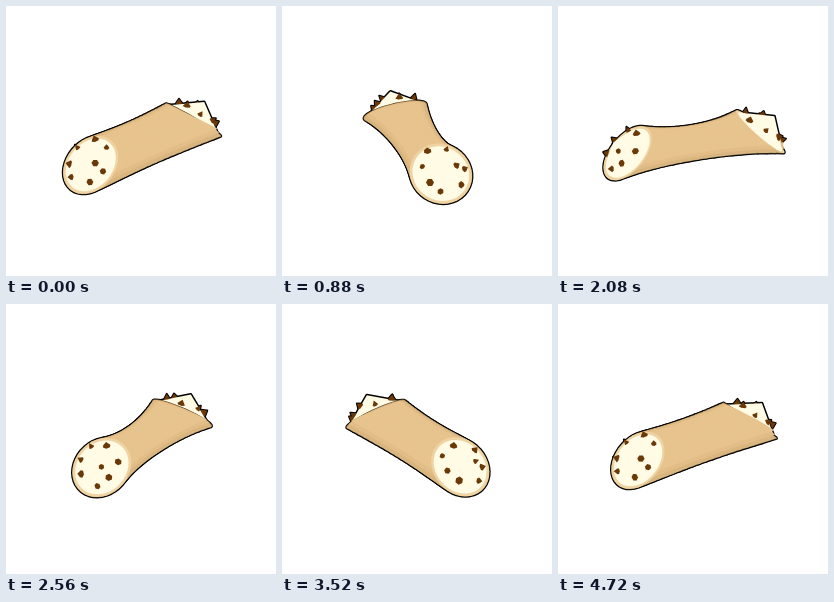
These frames come from a looping animation (270 px wide and 270 px high, 4.8 s). An HTML page with a canvas:

```html
<!DOCTYPE html>
<html>
<head>
<meta charset="utf-8">
<title>Turning cannoli</title>
<style>
html, body { margin: 0; width: 100%; height: 100%; overflow: hidden; background: #fff; }
canvas { display: block; width: 100vmin; height: 100vmin; }
</style>
</head>
<body>
<canvas id="stage" width="270" height="270"></canvas>
<script>
const ctx = document.getElementById('stage').getContext('2d');
const { sin, cos, PI, hypot, atan2 } = Math;
const STEP = 80, STEPS = 60, START = -47 * PI / 180;
const PITCH_SIN = 0.47, PITCH_COS = 0.883;
const HALF = 70, WIDE = 32, TALL = 22, SLANT = 23, PEAK = 15;
const WAIST = 0.8, TWIST = 0.2, LIP = 0.91;
const CREAM = '#fffbe4', CHOCOLATE = '#6b3908', RIM = '#efd3a2', EDGE = '#4d3519';
const SHELL = ['#d9b57f', '#e2bd87', '#e7c38d'];

// Chip places on each end, as sideways and upward fractions of the opening.
const CHIPS = [
  [[.31, .69], [-.28, .755], [.43, .07], [.72, -.03], [-.6, .26], [-.5, -.31], [.5, -.52], [-.22, -.64]],
  [[-.535, .48], [-.03, .65], [.59, .29], [-.64, -.03], [.265, -.09], [-.42, -.46], [.54, -.29], [.26, -.66]]
];

const ring = make => Array.from({ length: 40 }, (_, i) => make(i * PI / 20));
const add = (p, q, k = 1) => p.map((v, i) => v + q[i] * k);
const unit = p => p.map(v => v / hypot(...p));
const cross = (a, b) => [
  a[1] * b[2] - a[2] * b[1],
  a[2] * b[0] - a[0] * b[2],
  a[0] * b[1] - a[1] * b[0]
];

// Points are [along the tube, sideways, up].
const project = ([l, w, z], turn) => [
  136 + l * sin(turn) + w * cos(turn),
  136.5 + (l * cos(turn) - w * sin(turn)) * PITCH_SIN - z * PITCH_COS
];
const facing = ([l, w, z], turn) =>
  (l * cos(turn) - w * sin(turn)) * PITCH_COS + z * PITCH_SIN > 0;

const onCut = (u, v) => [HALF - SLANT * v, WIDE * u, TALL * v];
const cutRing = size => ring(a => onCut(size * cos(a), size * sin(a)));
const rim = cutRing(1), lip = cutRing(LIP);
const apex = [HALF + PEAK, 0, PEAK];

function slice(s, layer) {
  const size = (WAIST + (1 - WAIST) * s * s) * (1 - 0.11 * layer);
  return ring(a => {
    const w = WIDE * size * cos(a);
    const z = TALL * size * sin(a) - TWIST * (1 - s * s) * w;
    return [(HALF - SLANT * sin(a)) * s, w, z + 1.6 * layer];
  });
}

function makeChip([u, v], i) {
  const a = atan2(v, u), rest = 1 - hypot(u, v);
  const around = [-SLANT * cos(a), -WIDE * sin(a), TALL * cos(a)];
  const normal = unit(cross(around, add(apex, onCut(cos(a), sin(a)), -1)));
  const side = unit(around), up = cross(normal, side);
  const centre = add(onCut(u, v), [PEAK * rest, 0, PEAK * rest]);
  const size = 2.9 + (i * 3 % 4) * 0.4;
  const base = [0, 1, 2, 3, 4, 5].map(n =>
    add(add(centre, side, size * cos(n * PI / 3 + i)), up, size * sin(n * PI / 3 + i)));
  return { normal, points: [...base, add(centre, normal, 5.2)] };
}
const ends = CHIPS.map(list => list.map(makeChip));

function hull(points) {
  const sorted = [...points].sort((a, b) => a[0] - b[0] || a[1] - b[1]);
  const half = list => {
    const out = [];
    for (const p of list) {
      while (out.length > 1) {
        const [a, b] = out.slice(-2);
        if ((b[0] - a[0]) * (p[1] - a[1]) - (b[1] - a[1]) * (p[0] - a[0]) > 0) break;
        out.pop();
      }
      out.push(p);
    }
    return out.slice(0, -1);
  };
  return [...half(sorted), ...half(sorted.reverse())];
}

function solid(points, turn, fill, stroke, width) {
  ctx.beginPath();
  for (const p of hull(points.map(q => project(q, turn)))) ctx.lineTo(...p);
  ctx.closePath();
  ctx.fillStyle = fill;
  ctx.fill();
  if (!stroke) return;
  ctx.strokeStyle = stroke;
  ctx.lineWidth = width;
  ctx.stroke();
}

const tube = SHELL.map((_, layer) => {
  const slices = Array.from({ length: 21 }, (_, i) => slice(i / 10 - 1, layer));
  return slices.slice(1).map((s, i) => [...s, ...slices[i]]);
});

function drawTube(turn, outline) {
  if (outline) {
    for (const part of tube[0]) solid(part, turn, '#000', '#000', 3);
    return;
  }
  tube.forEach((parts, layer) => {
    for (const part of parts) solid(part, turn, SHELL[layer], SHELL[layer], 0.4);
  });
}

function drawEnd(chips, turn, open, outline) {
  const drawChips = front => {
    for (const chip of chips) {
      if (facing(chip.normal, turn) === front)
        solid(chip.points, turn, outline ? '#000' : CHOCOLATE, outline && '#000', 2);
    }
  };
  drawChips(false);
  if (outline) {
    solid([...lip, apex], turn, '#000', '#000', 3);
  } else {
    if (open) solid(rim, turn, RIM);
    solid([...lip, apex], turn, CREAM);
  }
  drawChips(true);
  if (!open && !outline) solid(rim, turn, EDGE, EDGE, 1.6);
}

function draw(turn) {
  ctx.fillStyle = '#fff';
  ctx.fillRect(0, 0, 270, 270);
  ctx.lineJoin = 'round';
  const sides = ends.map((chips, i) => {
    const angle = turn + i * PI;
    return { chips, angle, open: cos(angle) > -0.48 };
  });
  for (const outline of [true, false]) {
    for (const s of sides) if (!s.open) drawEnd(s.chips, s.angle, false, outline);
    drawTube(turn, outline);
    for (const s of sides) if (s.open) drawEnd(s.chips, s.angle, true, outline);
  }
}

const begin = performance.now();
function tick() {
  const step = Math.floor((performance.now() - begin) / STEP) % STEPS;
  draw(START + step * 2 * PI / STEPS);
  requestAnimationFrame(tick);
}
tick();
</script>
</body>
</html>
```
